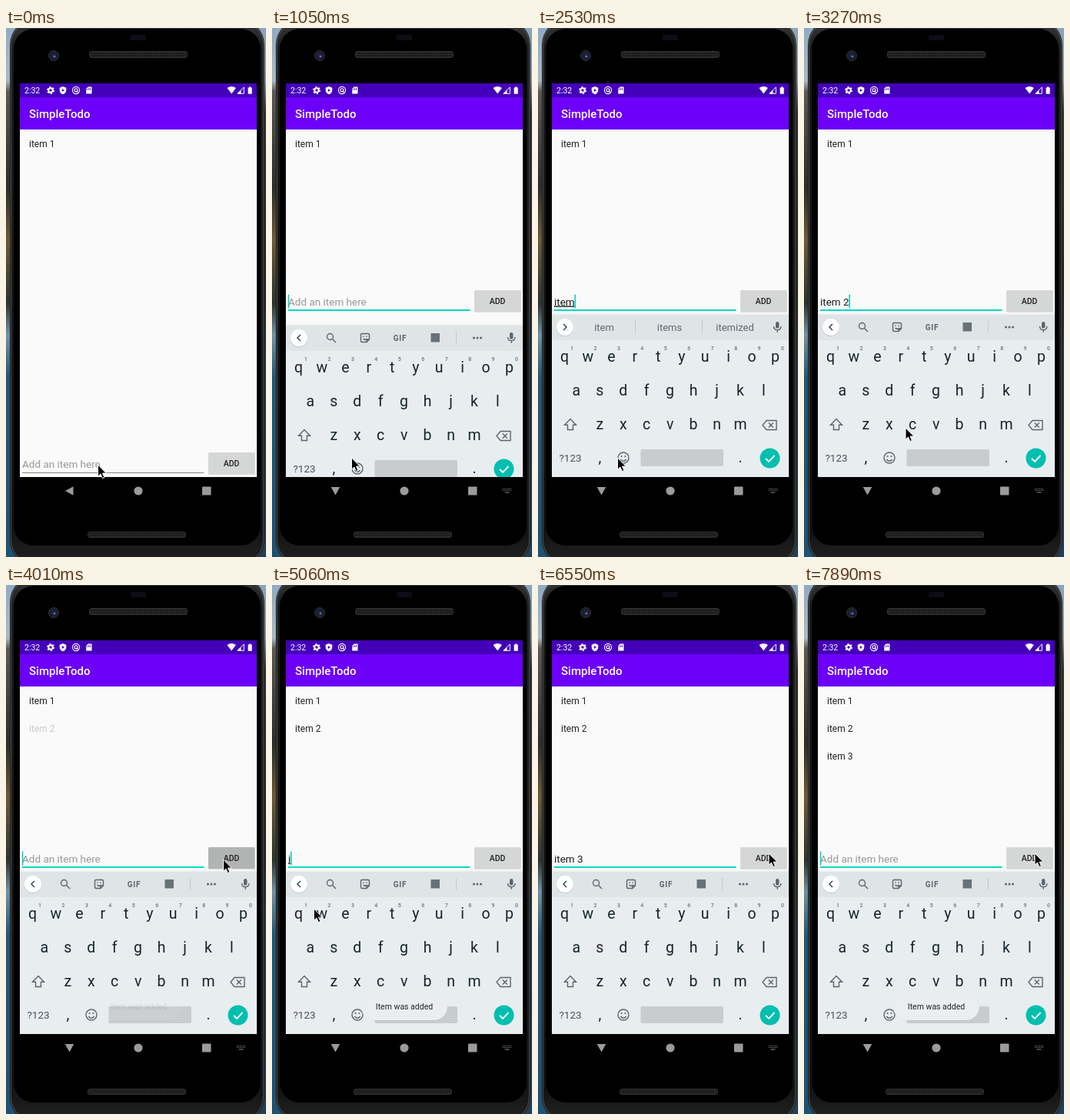
Write an HTML page that moves like this. It is 338 by 688 pixels and loops after 8000 ms.

```html
<!DOCTYPE html>
<html lang="en">
<head>
<meta charset="utf-8">
<title>Todo list demo</title>
<style>
html, body { margin: 0; width: 100%; height: 100%; overflow: hidden; background: #000; }
svg { display: block; width: 338px; height: 688px; }
text { font-family: Roboto, "Noto Sans", sans-serif; white-space: pre; }
.mid { text-anchor: middle; }
.line { fill: none; stroke: #5a666c; stroke-width: 1.4; }
.item { font-size: 12px; fill: #212121; }
.field { font-size: 13.5px; text-decoration-thickness: .8px; text-underline-offset: 1.5px; }
.key { font-size: 19.5px; fill: #15252c; }
.num { font-size: 7px; font-weight: 500; fill: #66737a; }
.word { font-size: 13px; fill: #5c686e; }
</style>
</head>
<body>
<svg viewBox="0 0 338 688">
  <defs>
    <linearGradient id="left" x2="0" y2="1">
      <stop offset="0" stop-color="#8fabc4"/><stop offset=".1" stop-color="#a9b9c4"/>
      <stop offset=".12" stop-color="#5a5a55"/><stop offset=".3" stop-color="#2c2e28"/>
      <stop offset=".4" stop-color="#6e5a38"/><stop offset=".52" stop-color="#2b342f"/>
      <stop offset=".58" stop-color="#6f93a6"/><stop offset=".66" stop-color="#235878"/>
      <stop offset="1" stop-color="#1d5274"/>
    </linearGradient>
    <linearGradient id="right" x2="0" y2="1">
      <stop offset="0" stop-color="#8aa5bd"/><stop offset=".1" stop-color="#8796a0"/>
      <stop offset=".16" stop-color="#3a3733"/><stop offset=".5" stop-color="#2b2a28"/>
      <stop offset=".62" stop-color="#253c4c"/><stop offset="1" stop-color="#20405a"/>
    </linearGradient>
    <linearGradient id="frame" x2="0" y2="1">
      <stop offset="0" stop-color="#3a3a3a"/><stop offset=".06" stop-color="#1a1a1a"/>
      <stop offset=".94" stop-color="#141414"/><stop offset="1" stop-color="#242424"/>
    </linearGradient>
    <pattern id="mesh" width="3" height="3" patternUnits="userSpaceOnUse">
      <rect width="3" height="3" fill="#1c1c1c"/><circle cx="1.5" cy="1.5" r=".8" fill="#333"/>
    </pattern>
    <clipPath id="screen"><rect x="18" y="72" width="308" height="512"/></clipPath>
  </defs>

  <rect width="169" height="688" fill="url(#left)"/>
  <rect x="169" width="169" height="688" fill="url(#right)"/>
  <rect x="5" y="-12" width="331" height="712" rx="34" fill="url(#frame)"/>
  <rect x="6.5" y="-10.5" width="328" height="709" rx="33" fill="none" stroke="#484848" stroke-width="1.2"/>
  <rect x="10" y="1" width="321" height="672" rx="26" fill="#000"/>
  <rect x="162" y="9" width="20" height="7" rx="2" fill="#0d0d18"/>
  <circle cx="62" cy="36" r="6.5" fill="#1d1e22" stroke="#303034"/>
  <circle cx="62" cy="36" r="3.2" fill="#1a2450"/>
  <circle cx="63" cy="37" r="1.3" fill="#6474c0"/>
  <rect x="108.5" y="30.5" width="127" height="8" rx="2.5" fill="url(#mesh)" stroke="#333"/>
  <rect x="106.5" y="655.5" width="127" height="7" rx="2.5" fill="url(#mesh)" stroke="#303030"/>

  <g clip-path="url(#screen)">
    <rect x="18" y="72" width="308" height="512" fill="#fafafa"/>
    <rect x="18" y="72" width="308" height="18" fill="#4400b9"/>
    <rect x="18" y="90" width="308" height="42" fill="#6c00f8"/>
    <g fill="#fff">
      <text x="24" y="85" font-size="10.5">2:32</text>
      <text x="30" y="117" font-size="15" font-weight="500">SimpleTodo</text>
      <circle cx="58" cy="81" r="2.7" fill="none" stroke="#fff" stroke-width="2"/>
      <circle cx="58" cy="81" r="4.2" fill="none" stroke="#fff" stroke-width="1.6" stroke-dasharray="2.2"/>
      <path d="M74 76l4.3 1.7v3c0 2.7-1.8 4.7-4.3 5.6c-2.5-.9-4.3-2.9-4.3-5.6v-3z"/>
      <path d="M72.8 79l3.2 2l-3.2 2z" fill="#4400b9"/>
      <g fill="none" stroke="#fff" stroke-width="1.1">
        <circle cx="91" cy="81" r="4.6"/><circle cx="91" cy="80.8" r="2.1"/><path d="M91.5 81.5l2.6 2.8"/>
      </g>
      <path d="M106.7 76.5h4.8v9h-7.3v-6.4z"/>
      <path d="M105.7 79v2M107.6 78v3M109.5 78v3" stroke="#4400b9" stroke-width=".8"/>
      <path d="M287.5 78q5.7-4 11.4 0l-5.7 7.5z"/>
      <path d="M309.3 77v8.3h-8.4z" fill="none" stroke="#fff"/><path d="M305.5 81v4.5h-4.6z"/>
      <path d="M314.6 77.5h1.4v-1h2.3v1h1.4v8.2h-5.1z"/>
    </g>
    <g id="items"></g>

    <g id="entry">
      <text id="hint" class="field" x="21" y="360.5" fill="#989898">Add an item here</text>
      <text id="typed" class="field" x="21" y="360.5" fill="#1d1d1d"></text>
      <rect x="21" y="367" width="236" height="1" fill="#858585"/>
      <rect id="accent" x="21" y="366" width="236.5" height="2" fill="#00dac6"/>
      <rect id="caret" y="346.5" width="1.5" height="18" fill="#00cdb9"/>
      <rect x="263" y="342" width="61" height="28" rx="2" fill="#000" opacity=".12"/>
      <rect x="263" y="341" width="60.5" height="28" rx="1.5" fill="#d5d6d6"/>
      <rect id="press" x="263" y="341" width="60.5" height="28" rx="1.5" fill="#b2b3b3"/>
      <text class="mid" x="293" y="358.7" font-size="10.5" font-weight="500" fill="#202020">ADD</text>
    </g>

    <g id="board">
      <rect x="18" y="371.5" width="308" height="1.5" fill="#eceff0"/>
      <rect x="18" y="373" width="308" height="211" fill="#e8edf0"/>
      <rect x="18" y="373" width="308" height="33" fill="#dfe4e7"/>
      <circle cx="35" cy="389.7" r="11.3" fill="#000" opacity=".12"/>
      <circle cx="35" cy="389" r="11" fill="#fff"/>
      <path id="chevron" class="line" style="stroke:#303a3f" d="M37 385l-4 4l4 4"/>
      <g id="tools">
        <circle class="line" cx="75.5" cy="387.5" r="4"/><path class="line" d="M78.5 390.5l4.5 4.5"/>
        <path class="line" d="M117 383.5h8q1.5 0 1.5 1.5v6l-3.5 3.5h-6q-1.5 0-1.5-1.5v-8q0-1.5 1.5-1.5zM126.5 391h-3.5v3.5M118.5 390q2.5 2.5 5 0M119 386.5v1.4M123 386.5v1.4"/>
        <text class="mid" x="166.5" y="392.6" font-size="10" font-weight="700" letter-spacing=".7" fill="#5a666c">GIF</text>
        <rect x="206.5" y="383" width="11.5" height="11.5" fill="#677278"/>
        <path d="M239.5 381v16" stroke="#c3cacd"/>
        <g fill="#5a666c"><circle cx="262.5" cy="389" r="1.5"/><circle cx="267" cy="389" r="1.5"/><circle cx="271.5" cy="389" r="1.5"/></g>
      </g>
      <g id="words">
        <path d="M126.5 380v18M213.5 380v18" stroke="#c3cacd"/>
        <text class="word mid" x="86" y="394"></text>
        <text class="word mid" x="171" y="394"></text>
        <text class="word mid" x="256" y="394"></text>
      </g>
      <rect x="309" y="382" width="4.4" height="8.6" rx="2.2" fill="#5a666c"/>
      <path class="line" d="M306.5 388q0 4.6 4.7 4.6t4.7-4.6M311.2 392.6v3.2"/>
      <g id="keys"></g>
      <path class="line" d="M42 508.5l7.5 7.8h-4v6.2h-7v-6.2h-4z"/>
      <path class="line" d="M297 510.5h13v12h-13l-5-6zM299.8 513.5l6 6M305.8 513.5l-6 6"/>
      <text class="mid" x="42" y="564" font-size="13.5" fill="#44525a">?123</text>
      <circle class="line" cx="111" cy="559" r="7"/>
      <path class="line" d="M107.3 561q3.7 4.6 7.4 0"/>
      <circle cx="108.6" cy="557" r="1.1" fill="#5a666c"/><circle cx="113.4" cy="557" r="1.1" fill="#5a666c"/>
      <rect x="133.5" y="548" width="107.5" height="22" rx="2" fill="#c8ccce"/>
      <circle cx="301.5" cy="559.5" r="13" fill="#00bfae"/>
      <path d="M296 559.8l4 4l7.5-7.8" fill="none" stroke="#fff" stroke-width="1.9"/>
    </g>
    <g id="toast">
      <rect x="116" y="532.6" width="112.5" height="34" rx="17" fill="#000" opacity=".06"/>
      <rect x="116" y="532" width="112" height="34" rx="17" fill="#ebeeef"/>
      <text class="mid" x="172" y="552" font-size="10.5" fill="#222">Item was added</text>
    </g>
  </g>

  <g fill="#9b9b9b">
    <path id="back" d="M77 602l10.5-5.8v11.6z"/>
    <circle cx="172" cy="602" r="5.6"/>
    <rect x="255" y="596.5" width="11.5" height="11" rx=".8"/>
    <g id="ime" fill="none" stroke="#8a8a8a">
      <path d="M300 599.5h11M300 601.5h11" stroke-dasharray="1"/>
      <path d="M302.5 604h6"/>
    </g>
  </g>
  <path id="mouse" d="M0 0v15.2l3.4-3.2l2.5 5.6l2.6-1.1l-2.5-5.4h4.9z" fill="#000" stroke="#fff" stroke-width="1"/>
</svg>
<script>
const LOOP = 8000, DOWN = 211;
const $ = id => document.getElementById(id);

function addText(parent, cls, x, y, str) {
  const el = document.createElementNS('http://www.w3.org/2000/svg', 'text');
  el.setAttribute('class', cls);
  el.setAttribute('x', x);
  el.setAttribute('y', y);
  el.textContent = str;
  parent.append(el);
  return el;
}

const rows = [['qwertyuiop', 34.5, 433.5], ['asdfghjkl', 49.8, 477.5], ['zxcvbnm', 80.3, 522]];
for (const [letters, x, y] of rows)
  [...letters].forEach((c, i) => addText($('keys'), 'key mid', x + i * 30.45, y, c));
[...'1234567890'].forEach((c, i) => addText($('keys'), 'num mid', 44 + i * 30.45, 418.7, c));
addText($('keys'), 'key mid', 80.5, 565, ',');
addText($('keys'), 'key mid', 263, 565, '.');
const items = [1, 2, 3].map((n, i) => addText($('items'), 'item', 30, 154.5 + 36 * i, 'item ' + n));

// board: how far the keyboard is pushed down; each step changes only what it names
const start = {
  mouse: [119.5, 568], text: '', compose: 0, words: null, caret: 0, accent: 0,
  open: 0, board: 214, press: 0, toast: 0, two: 0, three: 0
};
const itemWords = ['item', 'items', 'itemized'], itWords = ['it', 'its', 'itself'];
const steps = [
  [0, {}],
  [300, { accent: .45 }],
  [450, { accent: .8, mouse: [116, 567] }],
  [600, { accent: 1, caret: 1, mouse: [111, 564] }],
  [900, { open: 1, board: 70, mouse: [105, 560] }],
  [1050, { board: 14, mouse: [103.5, 559] }],
  [1200, { board: 0 }],
  [1350, { caret: 0 }],
  [1650, { caret: 1 }],
  [2090, { text: 'i', compose: 1 }],
  [2240, { text: 'it', words: itWords }],
  [2390, { text: 'ite', words: itemWords }],
  [2530, { text: 'item' }],
  [2680, { text: 'item ', compose: 0 }],
  [3120, { text: 'item 2', words: null }],
  [3270, { mouse: [132, 520] }],
  [3420, { mouse: [205, 437] }],
  [3570, { mouse: [268, 371] }],
  [3720, { mouse: [282.5, 357], caret: 0 }],
  [4010, { text: '', caret: 1, press: 1, two: .22, toast: .1 }],
  [4160, { press: .6, two: .6, toast: .5 }],
  [4310, { press: .2, two: 1, toast: .85, mouse: [165, 392] }],
  [4460, { press: 0, toast: 1, caret: 0, mouse: [54.5, 421] }],
  [5060, { text: 'i', compose: 1, caret: 1 }],
  [5210, { text: 'it', words: itWords }],
  [5510, { text: 'item', words: itemWords }],
  [5660, { text: 'item ', compose: 0 }],
  [5810, { text: 'item 3', words: null }],
  [5960, { toast: .5 }],
  [6100, { toast: 0, mouse: [92, 410] }],
  [6250, { mouse: [190, 380] }],
  [6400, { mouse: [280, 354], caret: 0 }],
  [6550, { mouse: [300, 349] }],
  [6840, { text: '', caret: 1, press: 1, three: .22, toast: .1 }],
  [6990, { press: .6, three: .6, toast: .5 }],
  [7140, { press: .2, three: 1, toast: .85 }],
  [7290, { press: 0, toast: 1 }],
  [7440, { caret: 0 }],
  [7890, { caret: 1 }]
];
let state = start;
const scenes = steps.map(([at, change]) => ({ at, ...(state = { ...state, ...change }) }));

const fade = (el, v) => { el.style.opacity = v; };
const shift = (el, x, y) => el.setAttribute('transform', `translate(${x} ${y})`);

function draw(s) {
  shift($('mouse'), ...s.mouse);
  shift($('entry'), 0, s.open ? 0 : DOWN);
  shift($('board'), 0, s.board);
  $('back').setAttribute('transform', s.open ? 'rotate(-90 82.5 602)' : '');
  fade($('ime'), s.open);
  fade($('hint'), s.text ? 0 : 1);
  $('typed').textContent = s.text;
  $('typed').style.textDecorationLine = s.compose ? 'underline' : 'none';
  $('caret').setAttribute('x', 20.8 + (s.text ? $('typed').getComputedTextLength() : 0));
  fade($('caret'), s.caret);
  fade($('accent'), s.accent);
  fade($('press'), s.press);
  fade($('toast'), s.toast);
  fade(items[1], s.two);
  fade(items[2], s.three);
  fade($('tools'), s.words ? 0 : 1);
  fade($('words'), s.words ? 1 : 0);
  $('words').querySelectorAll('text').forEach((el, i) => { el.textContent = s.words ? s.words[i] : ''; });
  $('chevron').setAttribute('transform', s.words ? 'rotate(180 35 389)' : '');
}

let shown = null;
const origin = performance.now();
function tick() {
  const t = (performance.now() - origin) % LOOP;
  const scene = scenes.findLast(s => s.at <= t);
  if (scene !== shown) draw(shown = scene);
  requestAnimationFrame(tick);
}
tick();
</script>
</body>
</html>
```
